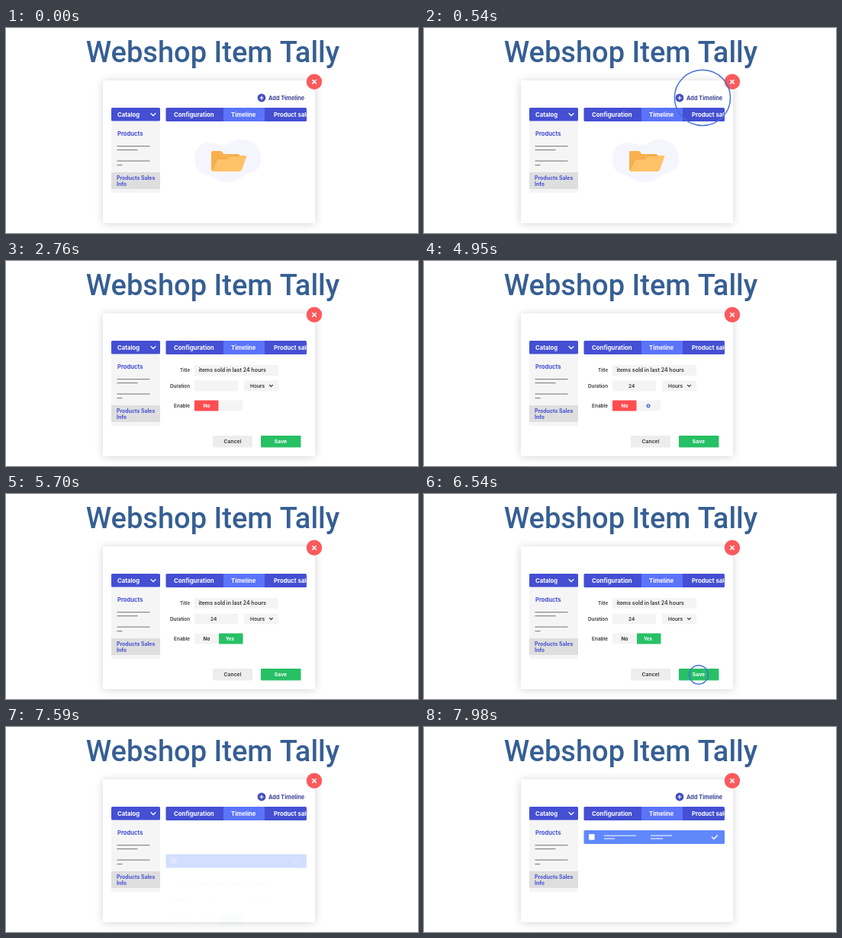
Write an HTML page with a canvas that moves like this. It is 540 px wide and 270 px high and loops after 8000 ms.

```html
<!DOCTYPE html>
<html lang="en">
<head>
<meta charset="utf-8">
<title>Webshop Item Tally</title>
<style>
html, body { margin: 0; width: 100%; height: 100%; overflow: hidden; background: #fff; }
canvas { display: block; width: 540px; height: 270px; }
</style>
</head>
<body>
<canvas id="stage" width="540" height="270"></canvas>
<script>
const ctx = document.getElementById('stage').getContext('2d');
const LOOP = 8000;
const BLUE = '#444fd3', INK = '#333338', FIELD = '#f4f4f4', GREEN = '#27c065', RED = '#ff4d50';
const PHRASE = 'items sold in last 24 hours';

const clamp = v => Math.max(0, Math.min(1, v));
const span = (t, a, b) => clamp((t - a) / (b - a));
const smooth = p => p * p * (3 - 2 * p);
const easeOut = p => 1 - (1 - p) ** 3;
const easeIn = p => p ** 3;

function box(x, y, w, h, color, r = 0) {
  ctx.fillStyle = color;
  ctx.beginPath();
  ctx.roundRect(x, y, w, h, r);
  ctx.fill();
}

function disc(x, y, r, color) {
  ctx.fillStyle = color;
  ctx.beginPath();
  ctx.arc(x, y, r, 0, 7);
  ctx.fill();
}

function line(points, color, width) {
  ctx.strokeStyle = color;
  ctx.lineWidth = width;
  ctx.lineCap = ctx.lineJoin = 'round';
  ctx.beginPath();
  points.forEach(([x, y]) => ctx.lineTo(x, y));
  ctx.stroke();
}

// y is the middle of the capitals
function text(str, x, y, size, color, align = 'left', weight = 700) {
  ctx.font = `${weight} ${size}px Inter, "Open Sans", sans-serif`;
  ctx.textAlign = align;
  ctx.fillStyle = color;
  ctx.fillText(str, x, y + size * 0.364);
}

function chevron(x, y, w, color) {
  line([[x - w, y - w / 2], [x, y + w / 2], [x + w, y - w / 2]], color, 1.2);
}

function layer(alpha, dy, draw) {
  if (alpha <= 0) return;
  ctx.save();
  ctx.globalAlpha = alpha;
  ctx.translate(0, dy);
  draw();
  ctx.restore();
}

function ring(t, start, x, y, max, grow = 420, fade = 60) {
  const end = start + grow;
  if (t <= start || t >= end + fade) return;
  layer(1 - span(t, end, end + fade), 0, () => {
    ctx.strokeStyle = '#4470da';
    ctx.lineWidth = 1.5;
    ctx.beginPath();
    ctx.arc(x, y, max * easeOut(span(t, start, end)), 0, 7);
    ctx.stroke();
  });
}

function heading() {
  ctx.font = '500 38px Roboto, "Open Sans", sans-serif';
  ctx.textAlign = 'center';
  ctx.fillStyle = '#365f93';
  ctx.fillText('Webshop Item Tally', 271, 45);
}

function card() {
  ctx.save();
  ctx.shadowColor = 'rgba(0,0,0,0.17)';
  ctx.shadowBlur = 12;
  ctx.shadowOffsetY = 1;
  box(127, 69, 278, 188, '#fff', 1);
  ctx.restore();
}

function sidebar() {
  box(138, 122, 64, 95, '#f5f5f5');
  box(138, 105, 64, 17.5, BLUE, 1.5);
  text('Catalog', 146, 114, 7.7, '#fff');
  chevron(193, 114, 3, '#fff');
  text('Products', 146, 139.5, 7.6, BLUE);
  [[155.5, 43], [160.5, 27], [175, 43], [180.5, 7]].forEach(([y, w]) =>
    box(145.5, y - 0.6, w, 1.3, '#8b8b8b'));
  box(138, 190, 64, 22, '#dedede');
  text('Products Sales', 145, 197, 6.9, BLUE);
  text('Info', 145, 205.5, 6.9, BLUE);
}

function tabs() {
  ctx.save();
  ctx.beginPath();
  ctx.roundRect(209.5, 105, 184.5, 18, 1.5);
  ctx.clip();
  box(209, 105, 186, 18, BLUE);
  box(285, 105, 54, 18, '#5b74fa');
  text('Configuration', 220, 114, 7.8, '#fff');
  text('Timeline', 295, 114, 7.7, '#fff');
  text('Product sales', 351, 114, 7.7, '#fff');
  ctx.restore();
}

function closeButton() {
  disc(404, 70.8, 10.2, '#fb5a5c');
  line([[401.7, 68.5], [406.3, 73.1]], '#fff', 1.5);
  line([[406.3, 68.5], [401.7, 73.1]], '#fff', 1.5);
}

function addLink() {
  disc(335, 92, 5.4, '#434cc0');
  line([[332.8, 92], [337.2, 92]], '#fff', 1.2);
  line([[335, 89.8], [335, 94.2]], '#fff', 1.2);
  text('Add Timeline', 344, 92, 7.35, '#3d4495');
}

function shape(d, color) {
  ctx.fillStyle = color;
  ctx.fill(new Path2D(d));
}

function folder() {
  shape('M247 173C246 160 255 150 268 151C280 152 286 158 296 150C306 143 325 147 331 160' +
    'C337 173 334 188 322 190C310 192 307 203 291 203C276 204 271 194 261 193C251 191 248 184 247 173Z', '#f5f6fd');
  shape('M269 164Q269 162 271 162H281Q283 162 284 164L285 166H304Q306 166 306 168V188H271Q269 188 269 186Z', '#f8b04e');
  shape('M270 188L276 174Q277 172 279 172H290L294 168H313Q316 168 315 170L309 187Q308 189 306 189H271Q269 189 270 188Z', '#ffc268');
  line([[270.5, 186], [276, 174], [278, 172.5], [290, 172.5], [294, 168.5], [306, 168.5]], '#e9a142', 0.8);
}

function toggle(t) {
  const p = smooth(span(t, 5250, 5700));
  const from = [255, 77, 80], to = [39, 192, 101];
  const mix = from.map((v, i) => Math.round(v + (to[i] - v) * p));
  const on = Math.round(51 + 204 * (1 - p));
  box(247, 183.5, 63.5, 14, FIELD, 1);
  box(247 + 32 * p, 183.5, 31.5, 14, p ? `rgb(${mix})` : RED, 1);
  text('No', 263, 190.7, 6.7, `rgb(${on},${on},${on})`, 'center');
  if (p > 0) layer(ctx.globalAlpha * p, 0, () => text('Yes', 293.5, 190.7, 6.2, '#fff', 'center'));
}

function form(t) {
  text('Title', 241, 144, 6.1, INK, 'right', 600);
  text('Duration', 241, 164.5, 6.3, INK, 'right', 600);
  text('Enable', 241, 190.7, 6.4, INK, 'right', 600);
  box(247, 137, 110, 14, FIELD, 1);
  box(247, 157.5, 57, 14, FIELD, 1);
  box(312, 157.5, 45, 14, FIELD, 1);

  const count = Math.floor(PHRASE.length * smooth(span(t, 1200, 2750)) + 1e-6);
  text(PHRASE.slice(0, count), 252.5, 143.7, 7, INK, 'left', 600);
  text('24'.slice(0, t < 3780 ? 0 : t < 3870 ? 1 : 2), 268, 164.7, 6.6, INK, 'left', 600);
  text('Hours', 320, 164.5, 6.6, INK, 'left', 600);
  chevron(347.5, 164.3, 2, INK);
  toggle(t);

  box(271, 230, 52, 15.5, '#ededed', 1);
  text('Cancel', 297, 238, 6.8, INK, 'center', 600);
  box(334, 230, 52.5, 15.5, GREEN, 1);
  text('Save', 360, 238, 6.8, '#fff', 'center');
}

function row() {
  box(209.5, 136, 184.5, 18, '#6088fb', 1.5);
  box(216, 141, 7.6, 7.8, '#fff', 1.2);
  [[236, 143, 42], [236, 147, 14], [297, 143, 28], [297, 147, 16]].forEach(([x, y, w]) =>
    box(x, y - 0.6, w, 1.3, '#dfe7ff'));
  line([[377.5, 145], [380, 147.5], [384.5, 142.7]], '#fff', 1.5);
}

function render(t) {
  ctx.globalAlpha = 1;
  ctx.fillStyle = '#fff';
  ctx.fillRect(0, 0, 540, 270);
  heading();
  card();
  sidebar();
  tabs();

  layer(1 - span(t, 555, 720), 0, folder);
  layer(Math.max(1 - span(t, 555, 720), span(t, 6600, 6930)), 0, addLink);

  if (t > 570 && t < 7620) {
    const dy = 80 * (1 - easeOut(span(t, 570, 1080))) + 80 * easeIn(span(t, 7220, 7620));
    layer(span(t, 570, 900) * (1 - span(t, 7230, 7600)), dy, () => form(t));
  }
  layer(span(t, 7500, 7830), 60 * (1 - easeOut(span(t, 7500, 7970))), row);

  closeButton();
  ring(t, 0, 365, 91.8, 36.6, 540);
  ring(t, 1410, 251.5, 144, 12.5);
  ring(t, 3580, 274.5, 165.5, 12.5);
  ring(t, 4930, 294, 190.7, 12.5);
  ring(t, 6220, 360, 238, 12.5);
}

function tick(now) {
  render(now % LOOP);
  requestAnimationFrame(tick);
}
render(0);
requestAnimationFrame(tick);
</script>
</body>
</html>
```
